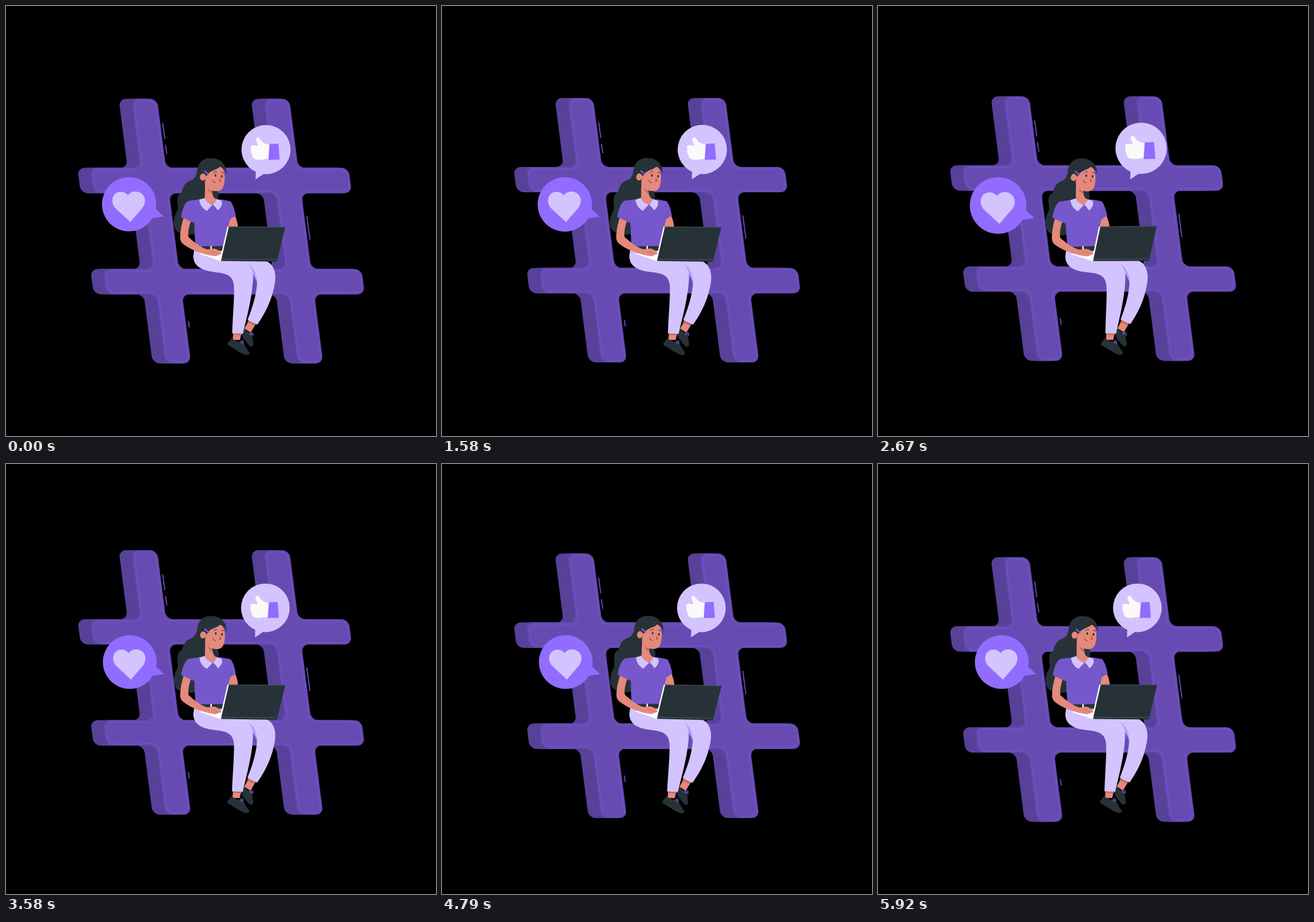
An HTML page for the animation above (5960 ms loop, 748 px wide and 748 px high).

```html
<!DOCTYPE html>
<html lang="en">
<head>
<meta charset="utf-8">
<title>Hashtag</title>
<style>
  html, body { margin: 0; height: 100%; overflow: hidden; background: #000; }
  svg { display: block; width: 100vw; height: 100vh; }
  .main { fill: #926cff; }
  .light { fill: #d3c4ff; }
  .shirt { fill: #7757cc; }
  .dark { fill: #263238; }
  .skin { fill: #e4897b; }
  .shade { fill: #c26a5e; }
  .white { fill: #fafafa; }
  .line { fill: none; stroke: #7c5be2; stroke-linecap: round; }
  .ink { fill: none; stroke: #263238; stroke-linecap: round; }
</style>
</head>
<body>
<svg viewBox="0 0 748 748">
  <g id="hash">
    <g id="side" fill="#584199"></g>
    <path id="front" fill="#674bb2" fill-rule="evenodd"/>
    <path id="inner" class="line" stroke-width=".7"/>
    <path class="line" stroke-width="1.5" d="M272.6 205.5l3.6 26M277.5 243l2.2 15M523.4 367.5l5.2 39.5M317.2 549.5l1.5 10"/>
  </g>

  <g id="bubbles">
    <g class="main">
      <circle cx="215.2" cy="344.5" r="46.7"/>
      <path d="M260 351.5L275 365.5L250 369.5Z"/>
    </g>
    <path class="light" d="M217.3 375L192 351.5C182 341 186 324 200 323C206 322.5 211 325.5 213.2 329C216 325 221 322 227 322.5C242 323.5 247.5 339 238 351Z"/>
    <g class="light">
      <circle cx="451.2" cy="250.2" r="42.3"/>
      <path d="M433.8 283L433.2 301.6L449 291Z"/>
    </g>
    <path class="white" d="M434.5 231C436 227.5 440 230 443 235C446 239 451 241 456.5 241.5L455 266.5C447 265.5 443 269.5 436 267.5C430 267 427 264 427.5 259C424.5 256 424.5 252 426 250C423.5 246 425 243 429 243C433 243 436 244.5 437.5 243C437 239 432.5 235 434.5 231Z"/>
    <path class="main" d="M457.5 240.5L471.5 240Q472.5 240 472.7 241L474.6 266Q474.7 267.5 473.5 267.6L455.5 268Z"/>
  </g>

  <g id="woman">
    <!-- back hair -->
    <path class="dark" d="M346 268C330 274 336 294 324 302.5C309 307 308 317 305 324.5C293 331 300 344 298.5 354C295 362 289 373 292.5 385C297 397 314 400 330 397L342 345L368 338C371 332 369 323 366 318L352 282Z"/>
    <!-- far leg -->
    <path class="skin" d="M424 545L436 551L426 568L415 561Z"/>
    <path class="shade" d="M422 547L435 553L433 556L420 550Z"/>
    <path class="dark" d="M414 557.5C410 564 411 574 413 578L423 590.5C428 594.5 431.5 592 430.5 586L427.5 567C422 569 416 564 414 557.5Z"/>
    <path class="light" d="M395 443H452C472 452 470 475 466 491C461 515 450 536 437.5 554L420.5 546C430 522 437 498 437 477C434 460 420 452 395 447Z"/>
    <path fill="#b69eff" d="M416 447C430 451 437 464 437.5 484C435 474 430 466 422 456Z"/>
    <!-- near leg -->
    <path class="skin" d="M396 567H410L407.5 581H394.5Z"/>
    <path class="shade" d="M395.5 569H411L410 573L395.5 571.5Z"/>
    <path class="dark" d="M393.5 577.5L386 586.5C385 589 387 590.5 390 592C400 597.5 408 604 416 606.5C424 608.5 426 604 422 600.5L411.5 583C406 586 398 582 393.5 577.5Z"/>
    <path class="light" d="M327.5 423L377 424L410 444C425 447 431 460 429.8 476C428 510 418 545 412.5 570L393.8 569.5C395 535 398 500 396.5 485C394 465 378 465 360 462.5C340 460 325 452 326 434Z"/>
    <path class="line" stroke-width="1.1" d="M408 585q3-5 5-2t-4 3q5-1 4 2M424 571q4-5 6-2t-5 2q6-1 5 3"/>
    <!-- far arm -->
    <path class="skin" d="M389 368L398 364C401 371 403 378 403.5 385H386Z"/>
    <!-- torso, neck and collar -->
    <path class="shirt" d="M318 339L337 336.5H374L390 339.5C395 345 397.5 355 399.5 364.5L390 370.5L385.5 385L380 419H329.5L327 377L304.5 367.5C307 355 310 342 318 339Z"/>
    <path fill="none" stroke="#6245ae" d="M327.5 362Q325 368 327 377L329 388M390 370Q389 364 391 357"/>
    <path class="skin" d="M346 303L345.5 334C347 341 354 345 359 345C364 344 366 339 366 336Q358 334 358.5 318Z"/>
    <path class="shade" d="M350 316Q354 321 358.5 322V327Q352 324 350 316Z"/>
    <path class="light" d="M345.5 334C347 340 352 343 359 346L349 356.5C343 353 337 348 336 337ZM366 336C365 340 363 343 359.5 345.5C363 348 366 352 368 355.5C374 351 377 345 374.5 338.5Z"/>
    <!-- head -->
    <path class="skin" d="M347 293C350 282 362 275 374 280C381 287 382 303 377.5 315C374 324.5 360 323.5 353 318L346 307Z"/>
    <ellipse class="skin" cx="342" cy="297.5" rx="5.2" ry="6.3"/>
    <path class="dark" d="M332 297C330 277 339 264.500 356 264.500C373 264.500 384 276 383 293C381.500 286 378 282 371.500 279.500C366 286 353 285 348.500 297C346 290 339 289 337 297L333 307Z"/>
    <path class="line" style="stroke:#7757cc" stroke-width="3" d="M345.5 287.5L351 292.5"/>
    <g class="dark">
      <ellipse cx="364.2" cy="294.8" rx="1.4" ry="2.4"/>
      <ellipse cx="375" cy="296.5" rx="1.4" ry="2.4"/>
    </g>
    <path class="ink" stroke-width=".9" d="M360.5 290Q363 287 366.5 288M374 289.5Q377 288.8 379 291M359 303.5Q360 307 364 307.5"/>
    <path fill="#d94c48" d="M371.5 296.5Q371 301 374.5 304Q373 306.5 370 305.5Z"/>
    <!-- belt -->
    <path class="dark" d="M329.5 418.5L380 417.5L378 426L328 424Z"/>
    <path class="white" d="M355.5 417.5H358V425.5H355.5Z"/>
    <!-- laptop and near arm -->
    <path class="white" d="M335.5 431L360 426L378 428L374 444Z"/>
    <path class="white" d="M385 383.8H389L377 443.5H371.5Z"/>
    <path class="dark" d="M387.5 383.8H484.5Q485.7 383.8 485.4 385L471.5 443Q471 444.5 469.5 444.5L374 443.5Z"/>
    <path fill="none" stroke="#56636a" stroke-width=".8" d="M376 440.5L470 441M388 384.2H484"/>
    <path class="skin" d="M309.5 366L322 373C318 384 316 394 317.5 402.5C326 410 336 418 347 422.5C353 425 358 421 364 422.5C369 424 374 427 374.5 430C374 433 372 432 369 433.5C364 437 358 434 350 433C335 429 319 423 308 414C303 410 302.5 405 303 399C303.5 388 306 377 309.5 366Z"/>
    <path fill="none" stroke="#c26a5e" stroke-width=".8" d="M357 428Q364 427 368 432"/>
    <path class="shirt" d="M318 339C310 343 306 356 304.5 367.5L326 377.5L331 350Z"/>
  </g>
</svg>
<script>
const $ = id => document.getElementById(id);
const mix = (a, b, f) => [a[0] + (b[0] - a[0]) * f, a[1] + (b[1] - a[1]) * f];

// Closed path through points, each corner rounded from distance r.
function rounded(points, r) {
  const n = points.length;
  const toward = (a, b) => mix(a, b, r / Math.hypot(b[0] - a[0], b[1] - a[1]));
  return points.map((p, i) => {
    const from = toward(p, points[(i + n - 1) % n]);
    const to = toward(p, points[(i + 1) % n]);
    return `${i ? 'L' : 'M'}${from}C${mix(from, p, .55)} ${mix(to, p, .55)} ${to}`;
  }).join('') + 'Z';
}

// Slanted hash sign, shrunk on every side by inset.
function hashPath(inset, r) {
  const xs = { L: 110.4, a: 197.6, b: 242.1, c: 427.6, d: 472.1, R: 559.8 };
  const ys = [162.7, 282.7, 326.8, 458.5, 502.6, 622.8];
  const trace = corners => rounded(corners.split(' ').map(([k, row]) => {
    const y = ys[row] + ('013'.includes(row) ? inset : -inset);
    const x = xs[k] + ('Lac'.includes(k) ? inset : -inset);
    return [x + 0.128 * y, y];
  }), r);
  return trace('a0 b0 b1 c1 c0 d0 d1 R1 R2 d2 d3 R3 R4 d4 d5 c5 c4 b4 b5 a5 a4 L4 L3 a3 a2 L2 L1 a1')
    + trace('b2 c2 c3 b3');
}

const face = hashPath(0, 12.5);
$('front').setAttribute('d', face);
$('inner').setAttribute('d', hashPath(3.4, 11.5));
$('side').innerHTML = [22.3, 18, 14, 10, 6, 2]
  .map(x => `<path fill-rule="evenodd" transform="translate(${-x})" d="${face}"/>`).join('');

// Linear interpolation between [position, value] stops.
function keyed(stops, p) {
  const i = stops.findIndex(s => s[0] > p);
  const [p0, v0] = stops[i - 1], [p1, v1] = stops[i];
  return v0 + (v1 - v0) * (p - p0) / (p1 - p0);
}

const FLOAT = [[0, 0], [.5, -15], [1, 0]];
const SWAY = [[0, 0], [.25, 1], [.75, -1], [1, 0]];
const BEAT = [[0, 1], [.1, 1.1], [.3, 1], [.4, 1], [.5, 1.1], [.6, 1], [1, 1]];
const LOOP = 5960, STEP = LOOP / 143, LEAD = 56;

function draw(now) {
  const t = Math.floor((now % LOOP + 6) / STEP) % 143 * STEP + LEAD;
  const short = t % 1500 / 1500, long = t % 6000 / 6000;
  $('hash').setAttribute('transform', `translate(0 ${keyed(FLOAT, short)})`);
  $('woman').setAttribute('transform', `rotate(${keyed(SWAY, short)} 388 435)`);
  $('bubbles').setAttribute('transform',
    `translate(331 299.6) scale(${keyed(BEAT, long)}) translate(-331 -299.6)`);
}

const start = performance.now();
function tick() {
  draw(performance.now() - start);
  requestAnimationFrame(tick);
}
tick();
</script>
</body>
</html>
```
